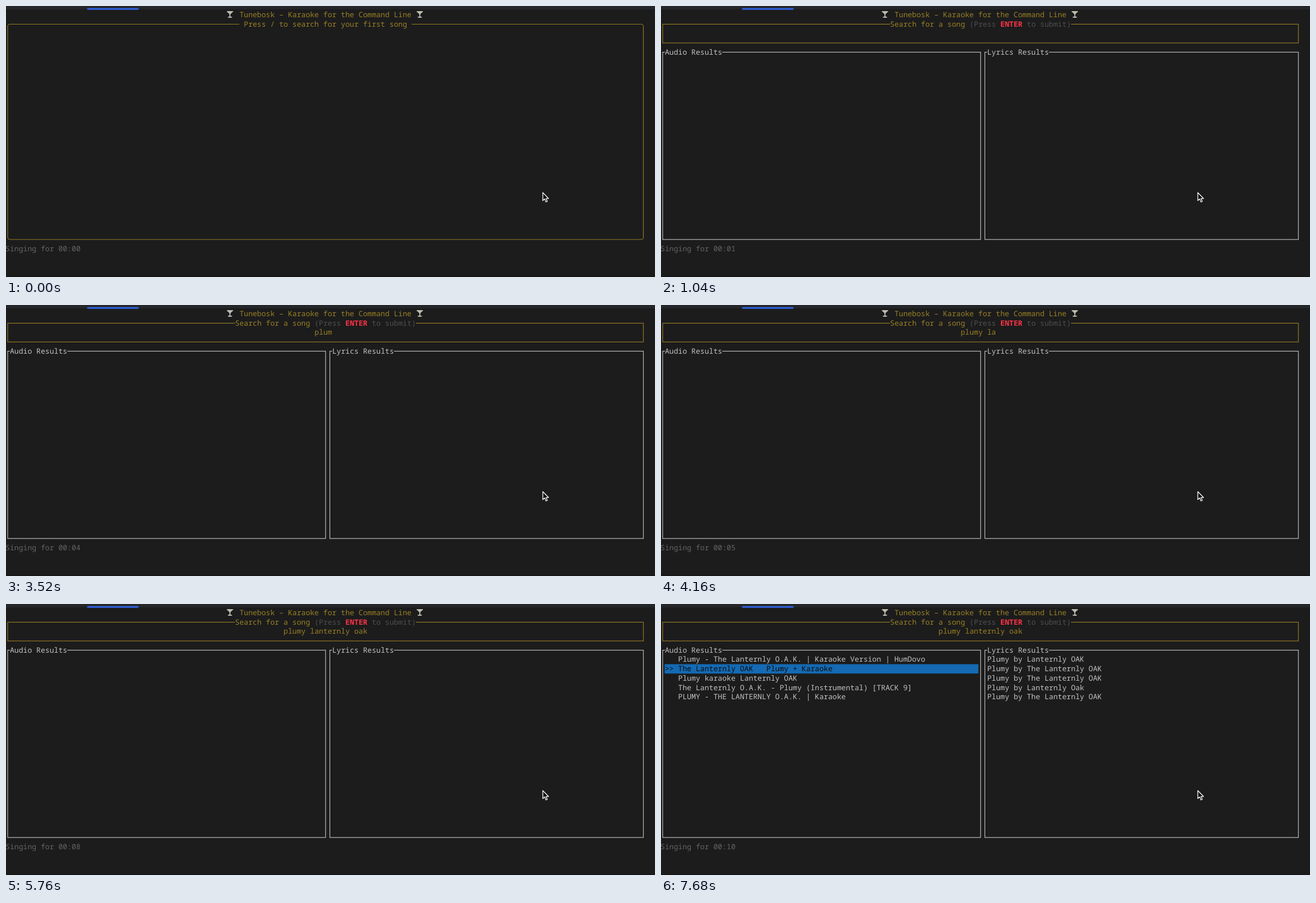
Recreate the animation shown at these times as an HTML page. Size 1157 by 484 pixels, loop 8 s.

```html
<!DOCTYPE html>
<html lang="en">
<head>
<meta charset="utf-8">
<title>Terminal karaoke</title>
<style>
  html, body { margin: 0; width: 100%; height: 100%; overflow: hidden; background: #1c1c1d; }
  svg { display: block; width: 1157px; height: 484px; }
  text {
    font: 13.12px "Noto Sans Mono", "DejaVu Sans Mono", monospace;
    white-space: pre;
    text-rendering: geometricPrecision;
  }
  .box { fill: none; stroke-width: 1.2; }
  .gold { stroke: #947b20; }
  .pale { stroke: #bdbdbd; }
</style>
</head>
<body>
<svg id="stage" viewBox="0 0 1157 484">
  <defs>
    <g id="glass">
      <path d="M-5.5 -5.5H5.5L1 -.5H-1Z" fill="#b9b6a4"/>
      <path d="M-5.5 -5.2H5.5M0 -1V4.5M-3.5 4.7H3.5" stroke="#e6e3d6" stroke-width="1.4"/>
    </g>
  </defs>
  <rect width="1157" height="484" fill="#1c1c1d"/>
  <rect width="1157" height="6" fill="#252629"/>
  <rect y="482.5" width="1157" height="1.5" fill="#151516"/>
  <rect x="144.5" y="3.8" width="92" height="3" rx="1.5" fill="#2f64e4"/>
  <use href="#glass" x="399.3" y="15.3"/>
  <use href="#glass" x="737.7" y="15.3"/>
  <g id="header"></g>
  <g id="welcome"><rect class="box gold" x="3" y="32.5" width="1133.3" height="384.5" rx="4"/></g>
  <g id="search">
    <rect class="box gold" x="3" y="32.5" width="1133.3" height="33.5"/>
    <rect class="box pale" x="3" y="82.5" width="566.7" height="334.5"/>
    <rect class="box pale" x="577.4" y="82.5" width="558.9" height="334.5"/>
  </g>
  <g id="results"><rect id="bar" x="6.5" width="559.3" height="16.7" fill="#146ab3"/></g>
  <path d="M957 333.3V347.6L960.3 344.6L962.6 350L965 349L962.7 343.8H967.2Z"
        fill="#111" stroke="#fff" stroke-width="1.3" stroke-linejoin="round"/>
</svg>
<script>
const $ = id => document.getElementById(id);
const NS = "http://www.w3.org/2000/svg";
const GOLD = "#9a8022", PALE = "#c2c2c2", DIM = "#4f4f50";
const colX = c => 7.87 * c - 0.94;
const rowY = r => 15.4 + 16.73 * r;

function add(parent, tag, attrs) {
  const el = document.createElementNS(NS, tag);
  for (const k in attrs) el.setAttribute(k, attrs[k]);
  return parent.appendChild(el);
}

function write(parent, col, row, str, fill, weight = 400) {
  const el = add(parent, "text", { x: colX(col), y: rowY(row) + 4.4, fill });
  el.style.fontWeight = weight;
  el.textContent = str;
  return el;
}

// Text that interrupts the border underneath it
function caption(parent, col, row, str, fill) {
  add(parent, "rect", {
    x: colX(col), y: rowY(row) - 5, width: colX(str.length) - colX(0), height: 10, fill: "#1c1c1d"
  });
  write(parent, col, row, str, fill);
}

const query = "plumy lanternly oak";
const audio = [
  "Plumy - The Lanternly O.A.K. | Karaoke Version | HumDovo",
  "The Lanternly OAK   Plumy + Karaoke",
  "Plumy karaoke Lanternly OAK",
  "The Lanternly O.A.K. - Plumy (Instrumental) [TRACK 9]",
  "PLUMY - THE LANTERNLY O.A.K. | Karaoke"
];
const lyrics = ["Lanternly OAK", "The Lanternly OAK", "The Lanternly OAK", "Lanternly Oak", "The Lanternly OAK"];

const header = $("header"), welcome = $("welcome"), search = $("search"), results = $("results");
write(header, 53, 0, "Tunebosk – Karaoke for the Command Line", GOLD);
const clock = write(header, 0, 25, "", "#646465");
caption(welcome, 53, 1, " Press / to search for your first song ", GOLD);
caption(search, 52, 1, "Search for a song" + " ".repeat(24), GOLD);
write(search, 70, 1, "(Press", DIM);
write(search, 77, 1, "ENTER", "#ff3346", 800);
write(search, 83, 1, "to submit)", DIM);
caption(search, 1, 4, "Audio Results", PALE);
caption(search, 74, 4, "Lyrics Results", PALE);
const input = write(search, 72, 2, "", GOLD);
const items = audio.map((s, i) => write(results, 4, 5 + i, s, PALE));
const marker = write(results, 1, 5, ">>", "#0b0b0c");
lyrics.forEach((s, i) => write(results, 74, 5 + i, "Plumy by " + s, PALE));

const ticks = [560, 1360, 2400, 3440, 4000, 4560, 5120, 5680, 7200, 7680];
const keys = [3120, 3360, 3440, 3520, 3680, 3840, 4000, 4160, 4320, 4480,
              4560, 4800, 4880, 5040, 5120, 5280, 5520, 5680, 5760];
const passed = (times, t) => times.filter(x => x <= t).length;
const show = (el, on) => el.setAttribute("visibility", on ? "visible" : "hidden");

function render(t) {
  clock.textContent = "Singing for 00:" + String(passed(ticks, t)).padStart(2, "0");
  show(welcome, t < 1040);
  show(search, t >= 1040);
  show(results, t >= 7200);

  const typed = passed(keys, t);
  input.textContent = query.slice(0, typed);
  input.setAttribute("x", colX(72 - Math.floor(typed / 2)));

  const picked = t < 7600 ? 0 : 1;
  $("bar").setAttribute("y", rowY(5 + picked) - 8.3);
  marker.setAttribute("y", rowY(5 + picked) + 4.4);
  items.forEach((el, i) => el.setAttribute("fill", i === picked ? "#0b0b0c" : PALE));
}

const start = performance.now();
function loop() {
  render((performance.now() - start) % 8000);
  requestAnimationFrame(loop);
}
loop();
</script>
</body>
</html>
```
